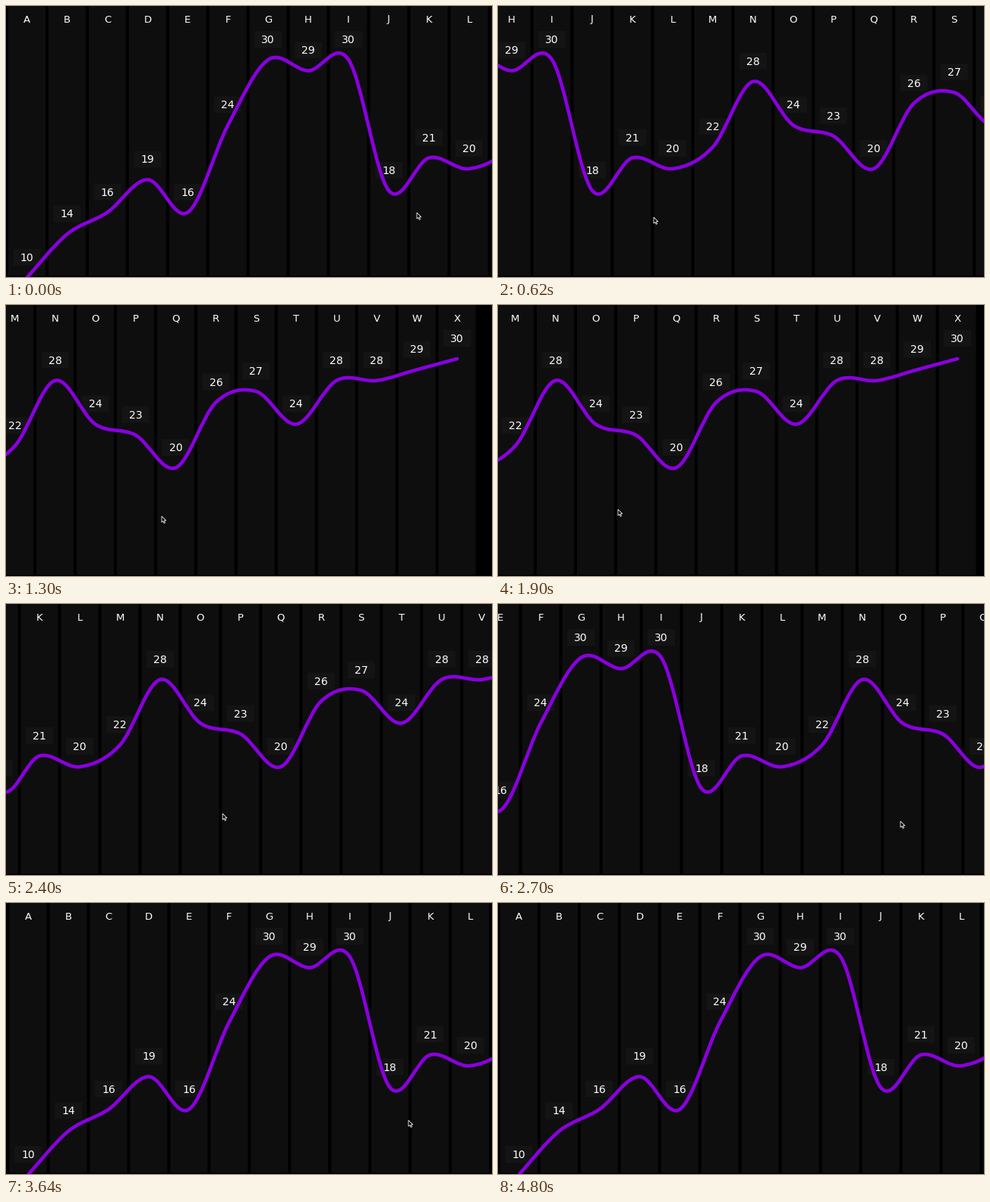
A matplotlib script that plays this animation: 640x358 px, repeating every 4.82 s.

```python
import numpy as np
import matplotlib.pyplot as plt
from matplotlib.animation import FuncAnimation
from matplotlib.patches import PathPatch, Polygon, Rectangle
from matplotlib.path import Path
from matplotlib.transforms import Affine2D

W, H, DPI = 640, 358, 100
LOOP, STEP = 4820, 20
PX = 72 / DPI  # points per pixel

VALUES = [10, 14, 16, 19, 16, 24, 30, 29, 30, 18, 21, 20,
          22, 28, 24, 23, 20, 26, 27, 24, 28, 28, 29, 30]
LETTERS = "ABCDEFGHIJKLMNOPQRSTUVWX"
FIRST_X, PITCH, COL_W = 27.5, 52.95, 49
UNIT = 14.4  # pixels per value

# time in ms, scroll offset in px: two throws, each with an elastic end
SCROLL = np.array([
    (0, 0), (40, 2), (300, 140), (560, 336), (620, 380), (850, 530),
    (1080, 636), (1260, 651.5), (1640, 642), (1900, 640.3), (2080, 640),
    (2200, 640), (2430, 488), (2660, 268), (2700, 236), (2870, 98),
    (3040, 4), (3220, -11.5), (3600, -2), (3860, -0.4), (4320, 0),
    (LOOP, 0)], float)


def monotone_slopes(x, y):
    d = np.diff(y) / np.diff(x)
    m = np.zeros_like(y)
    for i in range(1, len(y) - 1):
        if d[i - 1] * d[i] > 0:
            m[i] = 2 * d[i - 1] * d[i] / (d[i - 1] + d[i])
    return m


TIMES, OFFSETS = SCROLL.T
SLOPES = monotone_slopes(TIMES, OFFSETS)


def scroll_at(t):
    i = min(np.searchsorted(TIMES, t, side="right") - 1, len(TIMES) - 2)
    h = TIMES[i + 1] - TIMES[i]
    u = (t - TIMES[i]) / h
    a, b = OFFSETS[i], OFFSETS[i + 1]
    return (a + (b - a) * u * u * (3 - 2 * u)
            + h * SLOPES[i] * u * (1 - u) ** 2
            + h * SLOPES[i + 1] * u * u * (u - 1))


def smooth(u):
    u = min(max(u, 0), 1)
    return u * u * (3 - 2 * u)


def cursor_at(t, scroll):
    """Pointer tip; it holds the chart while dragging."""
    if t < 1640:
        return 541 - (scroll if t <= 560 else 336), 273 + 6 * smooth(t / 560)
    if t < 2200:
        u = smooth((t - 1640) / 260)
        return 205 - 47 * u, 279 - 9 * u
    u = smooth((t - 2200) / 460)
    return 158 + min(640 - scroll, 372), 270 + 17 * u


def cardinal_path(pts):
    """Smooth curve through all points, as cubic segments."""
    ext = np.vstack([pts[:1], pts, pts[-1:]])
    verts, codes = [pts[0]], [Path.MOVETO]
    for p0, p1, p2, p3 in zip(ext, ext[1:], ext[2:], ext[3:]):
        verts += [p1 + (p2 - p0) / 6, p2 - (p3 - p1) / 6, p2]
        codes += [Path.CURVE4] * 3
    return Path(verts, codes)


fig = plt.figure(figsize=(W / DPI, H / DPI), dpi=DPI, facecolor="black")
ax = fig.add_axes([0, 0, 1, 1])
ax.set_xlim(0, W)
ax.set_ylim(H, 0)
ax.axis("off")

shift = Affine2D()
moving = shift + ax.transData


def add_box(cx, top, w, h, color, z):
    ax.add_patch(Rectangle((cx - w / 2, top), w, h, fc=color, lw=0,
                           transform=moving, zorder=z, snap=False))


def add_text(x, baseline, s, size):
    return ax.text(x, baseline, s, color="white", fontsize=size * PX,
                   family="DejaVu Sans", ha="center", va="baseline",
                   transform=moving, zorder=4)


xs = FIRST_X + PITCH * np.arange(len(VALUES))
ys = 71 + UNIT * (30 - np.array(VALUES))
texts = []
for x, y, value, letter in zip(xs, ys, VALUES, LETTERS):
    add_box(x, 0, COL_W, 356.5, "#0e0e0e", 1)
    add_box(x, y - 38, 36, 22, "#141414", 2)
    texts.append((x, add_text(x, 21.5, letter, 13.3)))
    texts.append((x, add_text(x, y - 22, str(value), 14)))

ax.add_patch(PathPatch(cardinal_path(np.column_stack([xs, ys])), fc="none",
                       ec="#8a00e0", lw=4.6 * PX, capstyle="round",
                       joinstyle="round", transform=moving, zorder=3))

ARROW = np.array([(0, 0), (0, 8), (1.9, 6.4), (3.2, 9.3), (4.5, 8.7),
                  (3.3, 5.9), (5.8, 5.8)])
cursor = ax.add_patch(Polygon(ARROW, fc="black", ec="white", lw=0.8 * PX,
                              zorder=5, snap=False))


def draw(frame):
    t = frame * STEP
    scroll = scroll_at(t)
    shift.clear().translate(-scroll, 0)
    for x, text in texts:
        text.set_visible(-20 < x - scroll < W + 20)
    cursor.set_xy(ARROW + cursor_at(t, scroll))
    cursor.set_visible(t < 4400)
    return []


anim = FuncAnimation(fig, draw, frames=LOOP // STEP, interval=STEP,
                     init_func=lambda: draw(0), repeat=True, repeat_delay=0,
                     blit=False)
plt.show()
```
